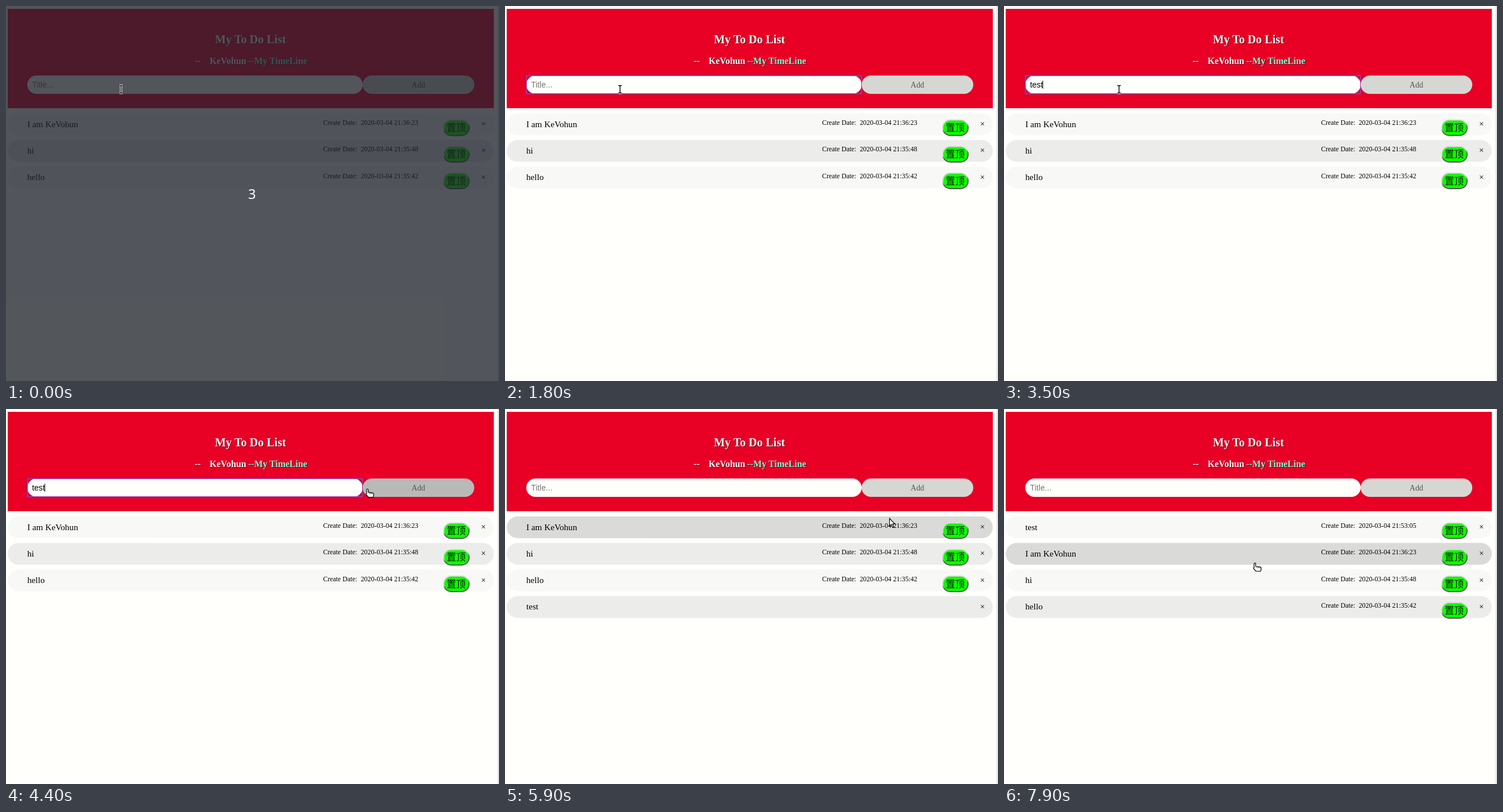
Write an HTML page that moves like this. It is 857x653 px and loops after 8 s.

```html
<!DOCTYPE html>
<html lang="en">
<head>
<meta charset="utf-8">
<title>My To Do List</title>
<style>
  html, body { margin: 0; width: 100%; height: 100%; overflow: hidden; background: #fffffc; }
  svg { display: block; }
  text { font-family: 'Liberation Serif', serif; white-space: pre; }
  .sans { font-family: 'Liberation Sans', sans-serif; }
  .cjk { font-family: 'Noto Sans CJK SC', 'Noto Sans CJK', sans-serif; }
  .bold { font-weight: bold; }
</style>
</head>
<body>
<svg id="stage" width="857" height="653" viewBox="0 0 857 653"></svg>
<script>
const LOOP = 8000, STEP = 100;
const ROW_TOP = 187, ROW_PITCH = 46.25, ROW_HEIGHT = 38;
const stage = document.getElementById('stage');

const rect = (x, y, w, h, fill, rx = 0, extra = '') =>
  `<rect x="${x}" y="${y}" width="${w}" height="${h}" rx="${rx}" fill="${fill}" ${extra}/>`;
const text = (x, y, size, content, fill = '#000', cls = '', extra = '') =>
  `<text x="${x}" y="${y}" font-size="${size}" fill="${fill}" class="${cls}" ${extra}>${content}</text>`;
const heading = (x, y, size, content, fill) =>
  text(x + 1, y + 1, size, content, 'rgba(40,0,10,.65)', 'bold') + text(x, y, size, content, fill, 'bold');
const between = (t, spans) => spans.some(([from, to]) => t >= from && t < to);

const DEFS = `<defs>
  <linearGradient id="bevel" x1=".3" y1="0" x2=".7" y2="1">
    <stop offset=".4" stop-color="#d6d8d6"/><stop offset=".6" stop-color="#555"/></linearGradient>
  <linearGradient id="panel" x1="0" y1="0" x2="0.3" y2="1">
    <stop offset="0" stop-color="#1d1e1b"/><stop offset="1" stop-color="#2c2d2a"/></linearGradient>
  <filter id="soft" x="-5%" y="-20%" width="110%" height="140%"><feGaussianBlur stdDeviation="1.5"/></filter>
</defs>`;

const OLD_ITEMS = [
  ['I am KeVohun', '21:36:23'],
  ['hi', '21:35:48'],
  ['hello', '21:35:42']
];

function itemsAt(t) {
  if (t < 5200) return OLD_ITEMS;
  return t < 6900 ? [...OLD_ITEMS, ['test']] : [['test', '21:53:05'], ...OLD_ITEMS];
}

// Input method states: start, typed letters, panel width, candidates
const SUGGESTIONS = [
  [2000, 't', 256, ['他', '她', '它', '他们', '太']],
  [2300, 'te', 304, ['特', '特别', '特点', '特殊', '特色']],
  [2400, "te's", 342, ['特殊', '特色', '托儿所', '托儿索', 'test']],
  [2900, "te's't", 342, ['特殊', '特色', '特使团', '特设厅', 'test']]
];

// Pointer stops: time, x, y, shape
const STOPS = [
  [4700, 687, 133, 'hand'],
  [5900, 668, 190, 'arrow'],
  [6000, 650, 262, 'arrow'],
  [6100, 687, 133, 'hand'],
  [6500, 672, 178, 'arrow'],
  [6600, 625, 238, 'arrow'],
  [6700, 599, 266, 'arrow'],
  [7700, 560, 266, 'hand'],
  [7800, 490, 267, 'hand'],
  [7900, 436, 268, 'hand']
];

function pointerAt(t) {
  if (t < 4700) {
    const p = Math.min(1, Math.max(0, (t - 3700) / 900));
    const eased = p * p * (3 - 2 * p);
    const x = 200 + 490 * eased;
    const y = 145 - 9 * eased + 5 * Math.sin(Math.PI * eased);
    return { x, y, shape: x > 620 ? 'hand' : 'beam' };
  }
  const [, x, y, shape] = STOPS.filter(stop => stop[0] <= t).pop();
  return { x, y, shape };
}

const POINTERS = {
  beam: `<path d="M-3-6.5h2l1 1 1-1h2M-3 6.5h2l1-1 1 1h2M0-5.5v11" fill="none" stroke="#fff" stroke-width="3.4"/>
    <path d="M-3-6.5h2l1 1 1-1h2M-3 6.5h2l1-1 1 1h2M0-5.5v11" fill="none" stroke="#000" stroke-width="1.4"/>`,
  hand: `<path d="M-1.3 8V1.6a1.4 1.4 0 0 1 2.8 0V6l7.5 .9q2 .4 2 2.2v2.4l-1 3H2.2L-2.2 9.9q-.3-2 .9-1.4z"
    fill="#fff" stroke="#000" stroke-width="1.2" stroke-linejoin="round"/>
    <path d="M4 7v2M6.5 7.2v2M9 7.5v2" stroke="#000" stroke-width=".8"/>`,
  arrow: `<path d="M.5.5V13.6l3-2.7 2.2 5.2 2.2-.9-2.2-5.1h4z" fill="#fff" stroke="#000" stroke-width="1.2"/>`
};

function header(t, pointer) {
  const focused = between(t, [[800, 5000]]);
  const typed = between(t, [[3500, 5200]]);
  const caretOn = between(t, [[800, 1800], [2300, 2900], [3500, 3800], [4400, 5000]]);
  const buttonHover = pointer.x > 620 && pointer.y > 121 && pointer.y < 153;
  let out = rect(3, 5, 845, 173, '#e80025')
    + heading(363.3, 65, 20.1, 'My To Do List', '#fff')
    + heading(328, 101, 15.8, '--', '#fff')
    + heading(354, 101, 15.8, 'KeVohun', '#fff')
    + heading(421, 101, 15.8, '--My TimeLine', '#7fffd4');
  if (focused) {
    out += rect(37, 121, 583, 32, 'rgba(110,20,110,.3)', 0,
      'stroke="#5a50d0" stroke-width="2" stroke-opacity=".5" filter="url(#soft)"');
  }
  out += rect(37, 121, 583, 32, '#fffffc', 16)
    + rect(620, 121, 194, 32, buttonHover ? '#b9b9b8' : '#d6d7d3', 16)
    + text(705, 141.5, 13.8, 'Add', '#555')
    + text(45.2, 142, 13.9, typed ? 'test' : 'Title...', typed ? '#000' : '#757575', 'sans');
  if (focused) out += rect(37.5, 121.5, 582, 31, 'none', 0, 'stroke="#a846b0"');
  if (caretOn) out += rect(typed ? 67 : 45, 130, 1, 14, '#000');
  return out;
}

function row([title, time], index, hovered) {
  const y = ROW_TOP + index * ROW_PITCH;
  const fill = hovered ? '#dadad9' : index % 2 ? '#ecedea' : '#f8f9f6';
  let out = rect(3, y, 845, ROW_HEIGHT, fill, 19)
    + text(37, y + 23.5, 15.2, title)
    + text(830, y + 23, 15, '×', '#000', '', 'text-anchor="middle"');
  if (time) {
    out += text(551.3, y + 20, 11.8, 'Create Date:')
      + text(616.7, y + 20, 11.8, '2020-03-04 ' + time)
      + rect(761, y + 11.5, 44, 27, '#10fa00', 13, 'stroke="url(#bevel)" stroke-width="1.8"')
      + text(766, y + 31.2, 16.6, '置顶', '#061a06', 'cjk');
  }
  return out;
}

function suggestionPanel(t) {
  if (!between(t, [[2000, 3500]])) return '';
  const [, letters, width, words] = SUGGESTIONS.filter(s => s[0] <= t).pop();
  const right = 56 + width;
  const choices = words.map((word, i) =>
    `<tspan dx="${i ? 12 : 0}" fill="${i ? '#f4f4f2' : '#858583'}">${i + 1}.${word}</tspan>`).join('');
  return rect(55, 162, width + 2, 72, 'rgba(0,0,0,.55)', 8, 'filter="url(#soft)"')
    + rect(56.5, 162.5, width - 1, 69, 'url(#panel)', 7, 'stroke="#454643"')
    + `<path d="M63 162.5H${right - 7}" stroke="#777875"/>`
    + text(71, 189, 13.6, letters + '<tspan fill="#888">|</tspan>', '#f4f4f2', 'cjk')
    + text(71, 220.5, 13.6, choices, '#f4f4f2', 'cjk')
    + `<path d="M${right - 40} 208.5v10l-5-5z" fill="#20415f"/>
       <path d="M${right - 31} 208v11l5.5-5.5z" fill="#2f83d8"/>`;
}

function hoveredRow(t, pointer) {
  if (pointer.y < ROW_TOP || between(t, [[6900, 7700]])) return -1;
  const offset = pointer.y - ROW_TOP;
  return offset % ROW_PITCH < ROW_HEIGHT ? Math.floor(offset / ROW_PITCH) : -1;
}

function render(t) {
  const pointer = pointerAt(t);
  const hovered = hoveredRow(t, pointer);
  let out = DEFS + rect(0, 0, 857, 653, '#fffffc') + rect(854.5, 0, 2.5, 653, '#e0e0de')
    + header(t, pointer)
    + itemsAt(t).map((item, i) => row(item, i, i === hovered)).join('')
    + suggestionPanel(t);
  if (t < 500) {
    out += rect(0, 0, 857, 653, 'rgba(31,35,43,.77)')
      + `<text x="427.5" y="336" font-size="24" fill="#fff" text-anchor="middle"
          style="font-family:'Noto Sans',sans-serif">3</text>`;
  }
  out += `<g transform="translate(${pointer.x} ${pointer.y})">${POINTERS[pointer.shape]}</g>`;
  stage.innerHTML = out;
}

let start = null, shown = -1;
function tick(now) {
  start ??= now;
  const t = Math.floor(((now - start) % LOOP) / STEP) * STEP;
  if (t !== shown) render(shown = t);
  requestAnimationFrame(tick);
}
render(0);
requestAnimationFrame(tick);
</script>
</body>
</html>
```
